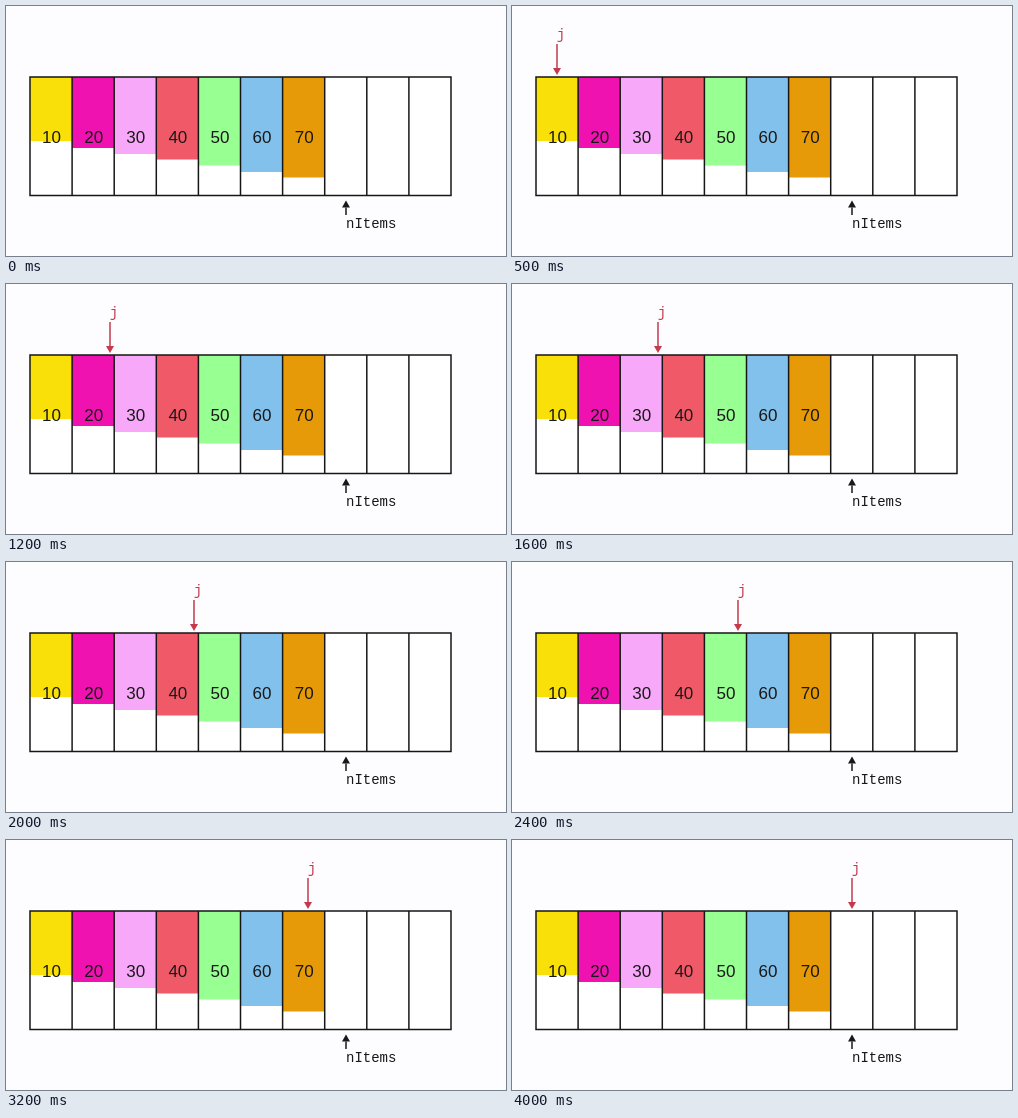
Write an HTML page with a canvas that moves like this. It is 500 by 250 pixels and loops after 4100 ms.

```html
<!DOCTYPE html>
<html lang="en">
<head>
<meta charset="utf-8">
<title>Scanning an array</title>
<style>
  html, body { margin: 0; width: 100%; height: 100%; overflow: hidden; }
  canvas { display: block; }
</style>
</head>
<body>
<canvas id="stage" width="500" height="250"></canvas>
<script>
const ctx = document.getElementById('stage').getContext('2d');
const LOOP = 4100, STEP = 100, APPEAR = 200;
const LEFT = 24, TOP = 71, BOTTOM = 189.5, CELL = 42.1, CELLS = 10;
const MONO = '14px "Liberation Mono", "Courier New", monospace';
const bars = [
  ['#f8e008', 135], ['#f012b0', 142], ['#f8a8f8', 148], ['#f05a68', 153.5],
  ['#98ff92', 159.5], ['#82c1ec', 166], ['#e69a08', 171.5]
];
// Pointer path as [time, x]
const path = [[600, 45], [1200, 104], [2000, 188], [3600, 340]];

function pointerX(t) {
  if (t <= path[0][0]) return path[0][1];
  for (let i = 1; i < path.length; i++) {
    const [t0, x0] = path[i - 1], [t1, x1] = path[i];
    if (t <= t1) return x0 + (x1 - x0) * (t - t0) / (t1 - t0);
  }
  return path[path.length - 1][1];
}

function line(x0, y0, x1, y1) {
  ctx.beginPath();
  ctx.moveTo(x0, y0);
  ctx.lineTo(x1, y1);
  ctx.stroke();
}

function arrow(x, tail, tip, color) {
  const back = tip + 7 * Math.sign(tail - tip);
  ctx.strokeStyle = ctx.fillStyle = color;
  line(x, tail, x, back);
  ctx.beginPath();
  ctx.moveTo(x, tip);
  ctx.lineTo(x - 4, back);
  ctx.lineTo(x + 4, back);
  ctx.fill();
}

function label(text, x, y, font, align) {
  ctx.font = font;
  ctx.textAlign = align;
  ctx.fillText(text, x, y);
}

function draw(t) {
  ctx.fillStyle = '#fdfcfe';
  ctx.fillRect(0, 0, 500, 250);
  ctx.fillStyle = '#fff';
  ctx.fillRect(LEFT, TOP, CELL * CELLS, BOTTOM - TOP);

  bars.forEach(([color, bottom], i) => {
    const x = LEFT + i * CELL;
    ctx.fillStyle = color;
    ctx.fillRect(x, TOP, CELL, bottom - TOP);
    ctx.fillStyle = '#181818';
    label((i + 1) * 10, x + CELL / 2 + 0.5, 137, '17px "Liberation Sans", Arial, sans-serif', 'center');
  });

  ctx.lineWidth = 1.5;
  ctx.strokeStyle = '#161616';
  ctx.strokeRect(LEFT, TOP, CELL * CELLS, BOTTOM - TOP);
  for (let i = 1; i < CELLS; i++) line(LEFT + i * CELL, TOP, LEFT + i * CELL, BOTTOM);

  arrow(340, 209, 194.5, '#181818');
  label('nItems', 340, 222, MONO, 'left');

  if (t >= APPEAR) {
    const x = pointerX(t);
    arrow(x, 38, 69, '#c43a4c');
    label('j', x + 4, 33, MONO, 'center');
  }
}

function tick(now) {
  draw(Math.floor(now % LOOP / STEP) * STEP);
  requestAnimationFrame(tick);
}
tick(performance.now());
</script>
</body>
</html>
```
